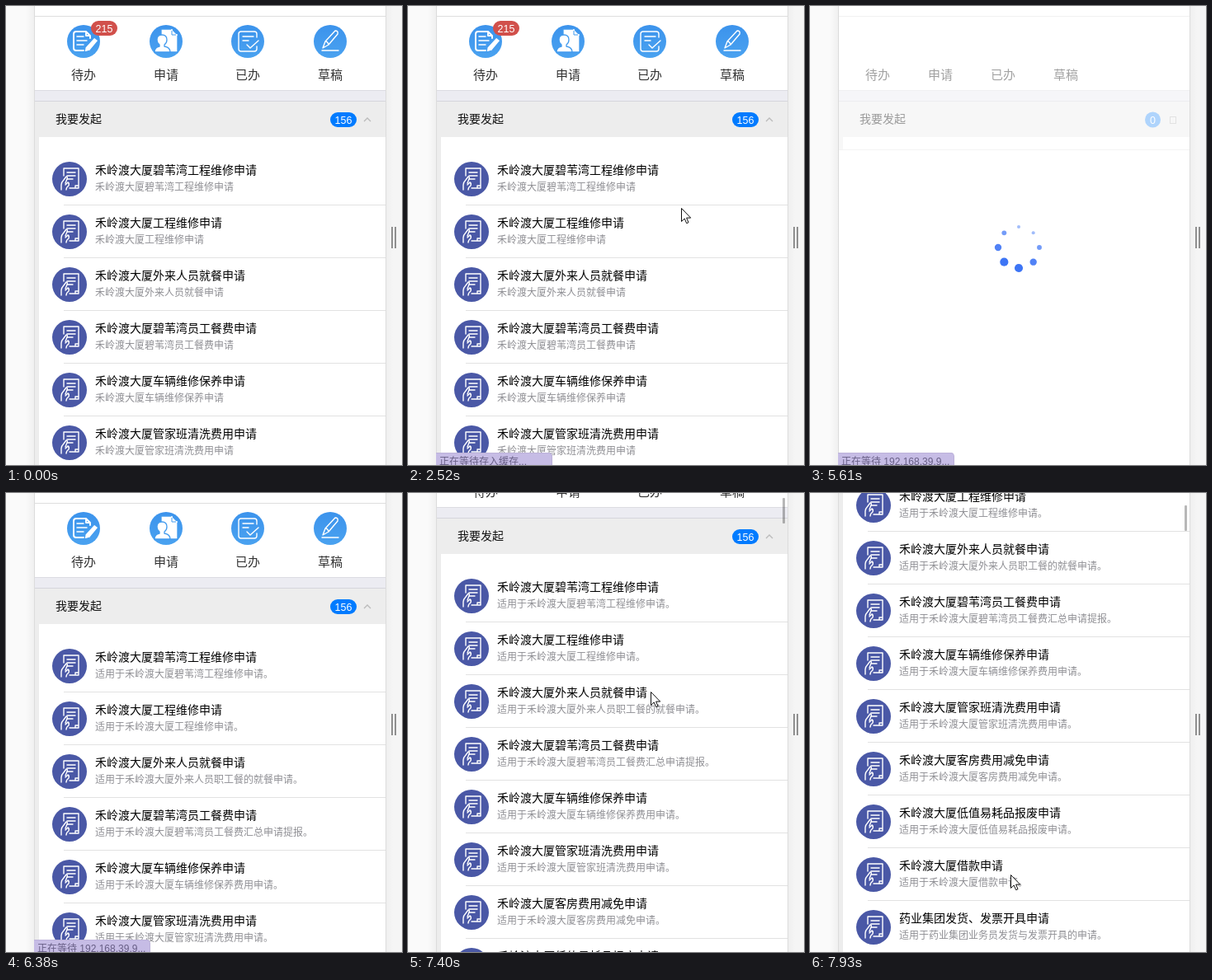
These frames come from a looping animation (480x557 px, 8000 ms). An HTML page:

```html
<!DOCTYPE html>
<html lang="zh-CN">
<head>
<meta charset="utf-8">
<title>移动审批</title>
<style>
  html, body { margin: 0; width: 100%; height: 100%; overflow: hidden; background: #fafafa; }
  svg { display: block; width: 100vw; height: 100vh; }
  text { font-family: "Liberation Sans", "Noto Sans CJK SC", "Noto Sans CJK", "Noto Sans", sans-serif; white-space: pre; }
  .line { fill: none; stroke: #fff; stroke-width: 1.4; stroke-linecap: round; stroke-linejoin: round; }
  .bold { stroke-width: 1.9; }
</style>
</head>
<body>
<svg id="stage" viewBox="0 0 480 557" xmlns="http://www.w3.org/2000/svg"></svg>
<script>
const LOOP = 8000;
const HOTEL = '禾岭渡大厦';
const BAY = '碧苇湾';

// [title, note after the reload when it differs]
const items = [
  [HOTEL + BAY + '工程维修申请'],
  [HOTEL + '工程维修申请'],
  [HOTEL + '外来人员就餐申请', HOTEL + '外来人员职工餐的就餐申请'],
  [HOTEL + BAY + '员工餐费申请', HOTEL + BAY + '员工餐费汇总申请提报'],
  [HOTEL + '车辆维修保养申请', HOTEL + '车辆维修保养费用申请'],
  [HOTEL + '管家班清洗费用申请'],
  [HOTEL + '客房费用减免申请'],
  [HOTEL + '低值易耗品报废申请'],
  [HOTEL + '借款申请'],
  ['药业集团发货、发票开具申请', '药业集团业务员发货与发票开具的申请']
];

// [label, required, label centre, divider y, value]
const fields = [
  ['维修地点', 1, 15, 37, '请选择维修地点'],
  ['报修人', 0, 55, 77, ''],
  ['报修时间', 1, 95, 117, 'date'],
  ['报修内容', 1, 135, 200, '请填写报修内容'],
  ['联系电话', 0, 218, 240, '请填写联系电话'],
  ['紧急程度', 1, 258, 280, '请选择紧急程度'],
  ['接单人', 1, 298, 320, ''],
  ['接单时间', 1, 338, 360, 'date'],
  ['备注', 0, 378, 443, '请填写备注']
];

const rect = (x, y, w, h, fill, more = '') =>
  `<rect x="${x}" y="${y}" width="${w}" height="${h}" fill="${fill}" ${more}/>`;
const circle = (x, y, r, fill, more = '') =>
  `<circle cx="${x}" cy="${y}" r="${r}" fill="${fill}" ${more}/>`;
const text = (s, x, mid, size, fill, anchor = 'start') =>
  `<text x="${x}" y="${mid + size * 0.37}" font-size="${size}" fill="${fill}" text-anchor="${anchor}">${s}</text>`;
const group = (id, body, more = '') => `<g id="${id}" ${more}>${body}</g>`;
const line = (d, bold = '') => `<path class="line ${bold}" d="${d}"/>`;
const solid = d => `<path d="${d}" fill="#fff" stroke="#439bee" stroke-width="1.3"/>`;

// Glyphs are drawn around the centre of their disc
const glyphs = [
  line('M8 -4V-7L3 -12H-9Q-12 -12 -12 -9V8Q-12 11 -9 11H5Q8 11 8 9M3 -12V-7H8', 'bold') +
    line('M-8 -6H0M-8 -1H4M-8 4H0') + solid('M2 7L13 -5L18 -1L8 11L1 13Z'),
  solid('M-6 -15H7L14 -8V13H-6Z') + line('M7 -14V-8H13', 'bold') +
    '<path d="M7 -13V-8H12" fill="none" stroke="#439bee"/>' +
    solid('M-5 -8Q1 -8 1 -2Q1 2 -2 4V6Q5 7 5 13H-14Q-14 7 -8 6V4Q-11 2 -11 -2Q-11 -8 -5 -8Z'),
  line('M11 -5V-9Q11 -12 8 -12H-8Q-11 -12 -11 -9V9Q-11 12 -8 12H8Q11 12 11 9V6M-6 -6H7M-6 -1H1M-1 4L3 8L13 -1'),
  line('M-10 11H10M-9 8L-6 0L6 -13Q10 -13 9 -9L-2 4ZM-6 0Q-3 0 -2 4')
];
const paper =
  line('M-7 -4V-13H11V11H0M7 11V8H11') + line('M-3 -8H7M-3 -4H7M-3 0H4') +
  line('M-10 13V7Q-10 4 -7 1L-4 -3Q-2 -3 -3 0L-5 5M-4 13Q-4 10 -1 8Q0 5 -2 4L-5 7');

const names = ['待办', '申请', '已办', '草稿'];

function bands() {
  return rect(35, 12, 425, 1, '#dedede') + rect(35, 102, 425, 14, '#ececf2') +
    rect(35, 102, 425, 1, '#dcdce2') + rect(35, 115, 425, 1, '#d6d6dc') +
    rect(35, 116, 425, 43, '#ededed') + text('我要发起', 60, 137, 14, '#111');
}

function home() {
  const menu = names.map((name, i) => {
    const x = Math.round(94 + i * 99.7);
    return `<g transform="translate(${x} 43)">${circle(0, 0, 20, 'url(#sky)')}${glyphs[i]}</g>` +
      text(name, x, 83, 15, '#333', 'middle');
  }).join('');
  const count = rect(393, 129, 32, 18, '#007bff', 'rx="9"') + text('156', 409, 138, 12.5, '#fff', 'middle') +
    '<path d="M434 140L438 136L442 140" fill="none" stroke="#bbb" stroke-width="1.3"/>';
  const rows = items.map(([title], i) => {
    const y = 210 + i * 64;
    return `<g transform="translate(77 ${y})">${circle(0, 0, 21, '#4a58a6')}${paper}</g>` +
      text(title, 108, y - 11.5, 14, '#000') + rect(70, y + 31, 390, 1, '#e2e2e2');
  }).join('');
  const notes = make => items.map((it, i) => text(make(it), 108, 220 + i * 64, 12, '#8f8f94')).join('');
  const badge = rect(103, 18, 32, 18, '#d1504b', 'rx="9"') + text('215', 119, 27, 12.5, '#fff', 'middle');
  return bands() + rect(35, 159, 5, 800, '#ededed') + menu + count + rows +
    group('notesA', notes(it => it[0])) +
    group('notesB', notes(it => `适用于${it[1] || it[0]}。`)) +
    group('badge', badge);
}

function shell() {
  return bands() + names.map((n, i) => text(n, 67 + i * 76, 83.5, 15, '#222')).join('') +
    rect(35, 159, 5, 15, '#ededed') + rect(35, 174, 425, 1, '#e4e4e4') +
    circle(415.5, 138, 9.5, '#007bff', 'opacity=".72"') + text('0', 415.5, 138, 12.5, '#fff', 'middle') +
    rect(436.5, 134.5, 7, 8, 'none', 'stroke="#bbb"');
}

function form() {
  const rows = fields.map(([label, need, mid, rule, value]) => {
    const star = need ? text('*', 52 + label.length * 13, mid + 1, 13, '#c0442f') : '';
    const entry = value === 'date' ? text('年 /月/日', 188.5, mid + 3, 13, '#111')
      : text(value, 184, mid + 3, 13, '#777');
    return text(label, 50, mid, 13, '#111') + star + entry + rect(50, rule, 410, 1, '#dfdfdf');
  }).join('');
  return rows + rect(35.5, 515.5, 424, 45, '#007bff', 'rx="22" stroke="#3d8fdd"') +
    text('提交', 247.5, 538, 16, '#fff', 'middle');
}

const stage = document.getElementById('stage');
stage.innerHTML = `
  <defs>
    <linearGradient id="sky" x1="0" y1="0" x2="0" y2="1"><stop stop-color="#3c93ec"/><stop offset="1" stop-color="#4aa2f0"/></linearGradient>
    <linearGradient id="shadeL"><stop stop-color="#fafafa"/><stop offset="1" stop-color="#f0f0f0"/></linearGradient>
    <linearGradient id="shadeR"><stop stop-color="#efefef"/><stop offset="1" stop-color="#f5f5f5"/></linearGradient>
    <clipPath id="screen"><rect x="35" y="0" width="425" height="557"/></clipPath>
  </defs>` +
  rect(0, 0, 480, 557, '#fafafa') + rect(24, 0, 10, 557, 'url(#shadeL)') +
  rect(461, 0, 19, 557, '#f5f5f5') + rect(461, 0, 8, 557, 'url(#shadeR)') +
  rect(34, 0, 427, 557, '#dcdcdc') + rect(35, 0, 425, 557, '#fff') +
  rect(467, 268, 2, 26, '#8f8f8f') + rect(471, 268, 2, 26, '#8f8f8f') +
  `<g clip-path="url(#screen)">` +
  group('home', home()) + group('shell', shell(), 'opacity=".42"') + group('form', form()) +
  group('spinner', Array.from({ length: 8 }, () => circle(0, 0, 3, '#3b73f5')).join('')) +
  group('thumb', rect(454, 1, 3, 31, '#000', 'rx="1" opacity=".28"')) + '</g>' +
  group('status', '<path d="M34 542H171Q174 542 174 545V557H34Z" fill="#c6bce5"/>' +
    '<path d="M34 542.5H171Q174.500 542.5 174.500 546V557" fill="none" stroke="#bcb2d9"/>' +
    group('waitCache', text('正在等待存入缓存...', 38, 553, 12, '#685f86')) +
    group('waitHost', text('正在等待 192.168.39.9...', 38, 553, 12, '#685f86'))) +
  group('cursor', '<path d="M.5 .5V16.500L4.200 13L6.700 18.700L9 17.700L6.600 12.100H11.700Z" fill="#fff" stroke="#111"/>');

const el = {};
stage.querySelectorAll('g[id]').forEach(g => el[g.id] = g);
const dots = [...el.spinner.children];

// Pointer paths: [time, x, y]
const paths = [
  [[100, 474, 545], [430, 450, 2], [650, 407, 30], [880, 436, 133], [1110, 302, 382], [1490, 302, 382],
   [1740, 266, 320], [2040, 336, 232], [2270, 336, 232], [2520, 331, 245], [2900, 331, 245],
   [3370, 357, 338], [3530, 357, 338], [3750, 342, 351], [4060, 342, 351], [4450, 278, 163],
   [4600, 278, 163], [4750, 73, 14]],
  [[6460, 95, 1], [6850, 283, 333], [7250, 283, 333], [7630, 316, 69], [7930, 243, 463], [8000, 243, 463]]
];

const clamp = v => Math.max(0, Math.min(1, v));
const smooth = v => v * v * (3 - 2 * v);

function pointer(t) {
  const path = paths.find(p => t >= p[0][0] && t < p[p.length - 1][0]);
  if (!path) return null;
  const i = path.findIndex(k => k[0] > t);
  const [t0, x0, y0] = path[i - 1], [t1, x1, y1] = path[i];
  const u = smooth((t - t0) / (t1 - t0));
  return [x0 + (x1 - x0) * u, y0 + (y1 - y0) * u];
}

// The list follows the drag, then coasts
const scrollAt = t => 243 * smooth(clamp((t - 7250) / 380)) +
  16 * (1 - (1 - clamp((t - 7630) / 300)) ** 2);

const show = (name, on) => el[name].setAttribute('display', on ? 'inline' : 'none');
const within = (t, a, b) => t >= a && t < b;

function spin(t) {
  const head = 112 + (t - 5610) * 0.36;
  dots.forEach((dot, i) => {
    const a = i * Math.PI / 4;
    const wave = (1 + Math.cos(a - head * Math.PI / 180)) / 2;
    dot.setAttribute('cx', 253 + 25 * Math.cos(a));
    dot.setAttribute('cy', 293 + 25 * Math.sin(a));
    dot.setAttribute('r', 1.9 + 3.3 * wave);
    dot.setAttribute('opacity', 0.35 + 0.65 * Math.sqrt(wave));
  });
}

function draw(t) {
  const opening = within(t, 2900, 3300);
  const returning = within(t, 5610, 6380);
  const scroll = scrollAt(t);
  show('home', t < 2900 || t >= 6380);
  show('notesA', t < 2900);
  show('badge', t < 2900);
  show('notesB', t >= 6380);
  show('form', within(t, 2900, 5610));
  el.form.setAttribute('opacity', opening ? 0.33 : 1);
  show('shell', returning);
  show('spinner', opening || returning);
  spin(t);
  el.home.setAttribute('transform', `translate(0 ${-Math.round(scroll)})`);
  show('thumb', t >= 6850);
  el.thumb.setAttribute('transform', `translate(0 ${Math.round(scroll * 0.0535)})`);
  show('status', within(t, 2340, 3600) || within(t, 5610, 7320));
  show('waitCache', t < 2900);
  show('waitHost', t >= 2900);
  const at = pointer(t);
  show('cursor', at);
  if (at) el.cursor.setAttribute('transform', `translate(${Math.round(at[0])} ${Math.round(at[1])})`);
}

const start = performance.now();
function tick() {
  draw((performance.now() - start) % LOOP);
  requestAnimationFrame(tick);
}
tick();
</script>
</body>
</html>
```
